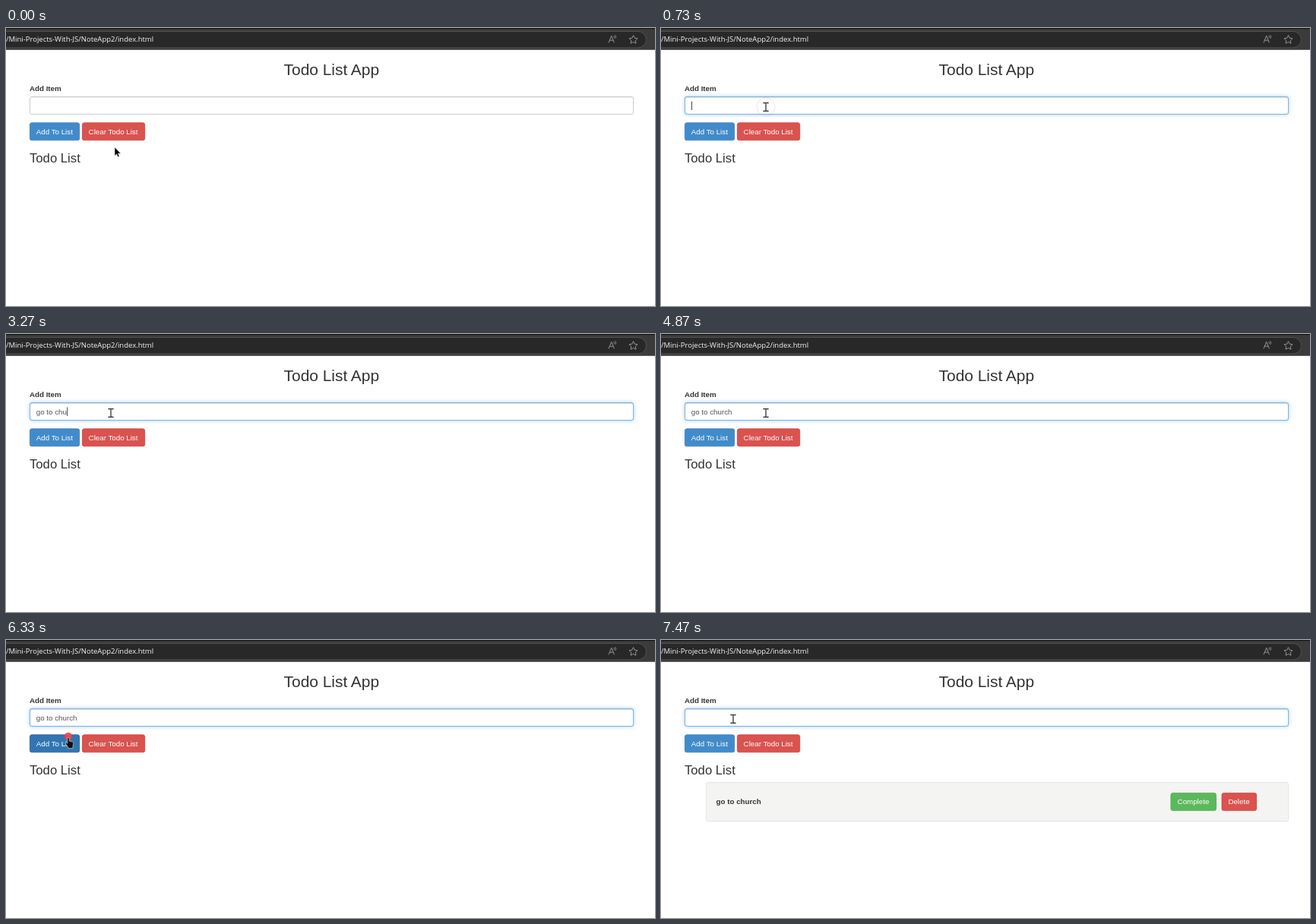
An HTML page that plays this animation: 854 px wide and 366 px high, repeating every 8000 ms.

```html
<!DOCTYPE html>
<html lang="en">
<head>
<meta charset="utf-8">
<title>Todo List App</title>
<style>
  html, body { margin: 0; width: 100%; height: 100%; overflow: hidden; background: #fff; }
  .field { position: absolute; box-sizing: border-box; left: 31px; top: 90.4px; width: 795px; height: 23.8px;
    border: 1px solid #ccc; border-radius: 3px; box-shadow: inset 0 1px 1px rgba(0,0,0,.075); }
  #focus { border-color: #78b6e6; box-shadow: inset 0 1px 1px rgba(0,0,0,.075), 0 0 5.6px rgba(102,175,233,.6); }
  svg { position: absolute; left: 0; top: 0; }
  text { font: 9.76px "Liberation Sans", Arial, sans-serif; fill: #333; white-space: pre; }
  .bold { font-weight: bold; }
  .button text { fill: #fff; }
  .primary { fill: #428bca; stroke: #357ebd; }
  .primary.hover { fill: #3276b1; stroke: #285e8e; }
  .danger { fill: #d9534f; stroke: #d43f3a; }
  .success { fill: #5cb85c; stroke: #4cae4c; }
  .button rect { stroke-width: .8; }
</style>
</head>
<body>
<div class="field"></div>
<div class="field" id="focus"></div>
<svg width="854" height="366" viewBox="0 0 854 366">
  <rect width="854" height="28.8" fill="#3b3b3b"/>
  <rect width="854" height="1.2" fill="#161616"/>
  <rect x="-30" y="4.5" width="872.5" height="21.5" rx="10.75" fill="#282828" stroke="#555" stroke-width=".9"/>
  <text x="0" y="18.4" style="font:9.5px 'Open Sans',sans-serif;fill:#f4f4f4">/Mini-Projects-With-JS/NoteApp2/index.html</text>
  <g fill="none" stroke="#a0a0a0" stroke-width=".9" stroke-linejoin="round">
    <path d="M793 19.3L796.7 10.3L800.4 19.3M794.3 16.2H799.1M799.9 10.2Q801 11.6 799.9 13M801.7 9.3Q803.5 11.6 801.7 13.9"/>
    <path id="star"/>
  </g>

  <text x="365.6" y="62" style="font-size:20.9px">Todo List App</text>
  <text x="31" y="83" class="bold">Add Item</text>
  <text id="typed" x="39.8" y="106" style="fill:#555"></text>
  <path id="caret" d="M40.5 96.5V108" stroke="#333" stroke-width=".9"/>

  <g class="button">
    <rect id="add" class="primary" x="31.4" y="124.8" width="65.3" height="23" rx="2.6"/>
    <text x="39.8" y="139.6">Add To List</text>
    <rect class="danger" x="100.4" y="124.8" width="82.3" height="23" rx="2.6"/>
    <text x="108.6" y="139.6">Clear Todo List</text>
  </g>
  <text x="31" y="177" style="font-size:16.7px">Todo List</text>

  <g id="item">
    <rect x="59.4" y="187.6" width="766.2" height="51" rx="2.6" fill="#f4f4f3" stroke="#e2e2e2" stroke-width=".9"/>
    <text x="72.6" y="216" class="bold">go to church</text>
    <g class="button">
      <rect class="success" x="670.9" y="201.4" width="59.6" height="23.2" rx="2.6"/>
      <text x="679.6" y="216.4">Complete</text>
      <rect class="danger" x="738" y="201.4" width="45.6" height="23.2" rx="2.6"/>
      <text x="746.4" y="216.4">Delete</text>
    </g>
  </g>

  <circle id="ripple" stroke="#e23a46"/>
  <g id="pointer">
    <path id="arrow" d="M0 0V11.2L2.6 8.9L4.3 12.7L6.1 11.9L4.5 8.2H8Z" fill="#000" stroke="#fff" stroke-width=".5"/>
    <path id="beam" d="M-3.6 -5.4H-.7L0 -4.9L.7 -5.4H3.6M0 -5V5M-3.6 5.4H-.7L0 4.9L.7 5.4H3.6" fill="none" stroke="#222" stroke-width="1.2"/>
    <path id="hand" d="M-1.2 1Q0 -.6 1.2 1V5L5.6 6Q7 6.5 6.8 8L6 12V14.6H-.4V12.6L-3.6 8.8Q-4.2 7 -2.6 7L-1.2 8.2Z" fill="#111" stroke="#fff" stroke-width=".5"/>
  </g>
</svg>
<script>
const LOOP = 8000, FRAME = 200 / 3, BLINK = 530;
const phrase = "go to church";
const $ = id => document.getElementById(id);
const clamp = v => Math.max(0, Math.min(1, v));
const show = (id, on) => $(id).style.display = on ? "" : "none";
const set = (id, attrs) => Object.entries(attrs).forEach(([k, v]) => $(id).setAttribute(k, v));

// [time, letters typed]
const typing = [[400, 0], [2000, 2], [2200, 3], [2330, 5], [2400, 6], [3070, 7], [3130, 8],
  [3270, 9], [3530, 10], [4270, 11], [4330, 12], [6465, 0]];
// [time, x, y]
const route = [[0, 143, 157], [400, 138, 104], [5800, 138, 104], [6270, 82, 128], [6400, 82, 128],
  [6600, 95, 122], [6730, 95, 104], [LOOP, 95, 104]];
const clicks = [[430, 138, 104], [6290, 82, 127], [6860, 95, 104]];

set("star", { d: "M" + Array.from({ length: 10 }, (_, i) => {
  const a = i * Math.PI / 5, r = i % 2 ? 2.9 : 5.8;
  return (825.5 + r * Math.sin(a)).toFixed(2) + " " + (15.5 - r * Math.cos(a)).toFixed(2);
}).join("L") + "Z" });

function pointerAt(t) {
  const i = route.findIndex(([time]) => time > t);
  const [t0, x0, y0] = route[i - 1], [t1, x1, y1] = route[i];
  const p = (t - t0) / (t1 - t0), e = p * p * (3 - 2 * p);
  return [x0 + (x1 - x0) * e, y0 + (y1 - y0) * e];
}

function drawField(t) {
  const last = typing.filter(([time]) => time <= t + 4).pop();
  $("focus").style.opacity = clamp((t - 470) / 150);
  $("typed").textContent = phrase.slice(0, last ? last[1] : 0);
  show("caret", last && (t + 4 - last[0]) % (2 * BLINK) < BLINK);
  const width = last && last[1] ? $("typed").getComputedTextLength() : 0;
  set("caret", { transform: `translate(${width} 0)` });
}

function drawPointer(t) {
  const [x, y] = pointerAt(t);
  const overField = y > 90 && y < 114;
  const overAdd = x > 31 && x < 97 && y > 124 && y < 148;
  show("beam", overField);
  show("hand", overAdd);
  show("arrow", !overField && !overAdd);
  set("pointer", { transform: `translate(${x} ${y})` });
  $("add").classList.toggle("hover", overAdd);
}

function drawRipple(t) {
  const click = clicks.find(([time]) => t >= time && t < time + 420);
  show("ripple", click);
  if (!click) return;
  const [time, cx, cy] = click, p = clamp((t - time - 130) / 290);
  set("ripple", { cx, cy, r: 4.6 + 9.4 * Math.sqrt(p), fill: p ? "none" : "#ee4a55",
    "stroke-width": 1.2, opacity: p ? .5 * (1 - p) ** 1.5 : .9 });
}

function draw(now) {
  const t = Math.floor((now % LOOP + 4) / FRAME) * FRAME % LOOP;
  drawField(t);
  drawPointer(t);
  drawRipple(t);
  show("item", t > 6460);
  requestAnimationFrame(draw);
}
draw(0);
</script>
</body>
</html>
```
